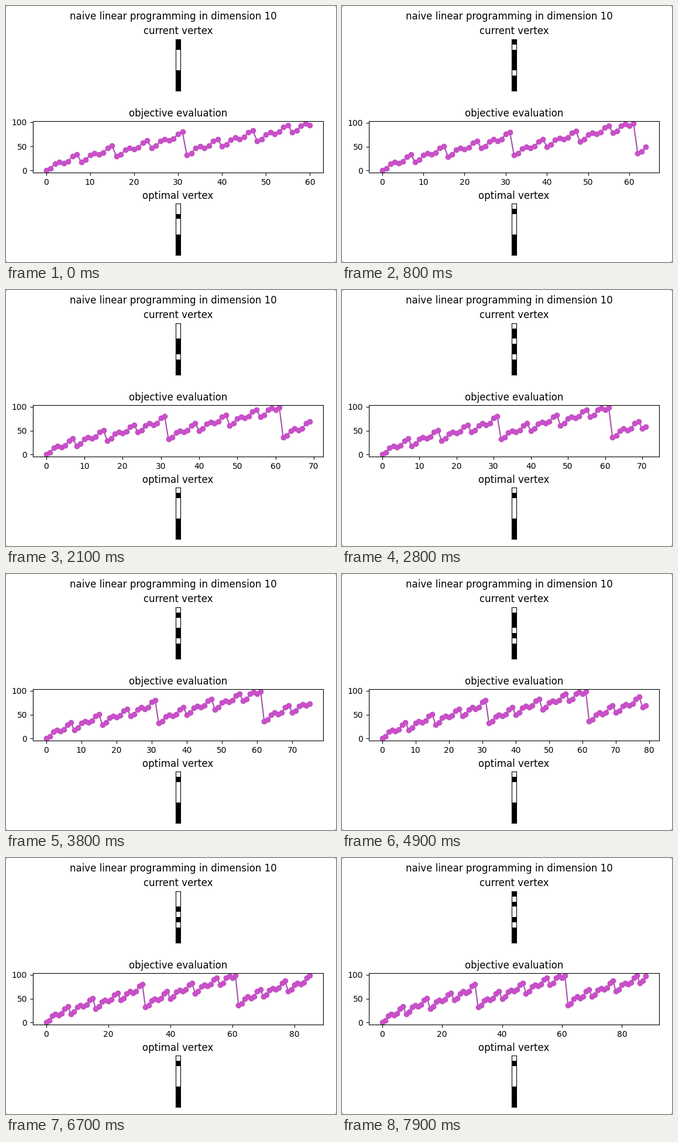
Recreate the animation shown at these times as a matplotlib script. Size 564x438 px, loop 8000 ms.

```python
import numpy as np
import matplotlib.pyplot as plt
from matplotlib.animation import FuncAnimation
from matplotlib.patches import FancyBboxPatch

plt.rcParams["font.family"] = "DejaVu Sans"

W, H, DPI = 564, 438, 100
TICK, FRAMES = 100, 80
DIM = 10
WEIGHTS = np.array([4, 14, 15, 18, 29, 32, 36, 40, 44, 48])
LIMIT = 100
FIRST = 60
# Tenths of a second at which the search visits another vertex
STEPS = [1, 3, 6, 8, 11, 13, 16, 19, 21, 24, 26, 29, 32, 35, 38, 40, 43, 46,
         49, 52, 55, 58, 61, 64, 67, 71, 74, 77]


def bits(k):
    return (k >> np.arange(DIM)) & 1


# Vertices in counting order, skipping the infeasible ones
visited = [k for k in range(128) if bits(k) @ WEIGHTS <= LIMIT]
visited = visited[:FIRST + len(STEPS) + 1]
scores = np.array([bits(k) @ WEIGHTS for k in visited])

fig = plt.figure(figsize=(W / DPI, H / DPI), dpi=DPI, facecolor="#8c8c8c")
fig.add_artist(FancyBboxPatch(
    (0, 0), W, H, boxstyle="round,pad=0,rounding_size=3", fc="white",
    ec="none", transform=None, zorder=-5))
fig.text(286 / W, 1 - 8.6 / H, "naive linear programming in dimension 10",
         ha="center", va="top", fontsize=12)


def add_axes(row, title):
    top = 56.6 + 140.8 * row
    ax = fig.add_axes([46 / W, 1 - (top + 88) / H, 496 / W, 88 / H])
    ax.set_title(title)
    return ax


def add_vertex(row, title):
    ax = add_axes(row, title)
    ax.set_xticks([])
    ax.set_yticks([])
    return ax.imshow(np.zeros((DIM, 1)), cmap="gray", vmin=0, vmax=1)


current = add_vertex(0, "current vertex")
plot = add_axes(1, "objective evaluation")
optimal = add_vertex(2, "optimal vertex")
line, = plot.plot([], [], "o-", color="#a94fa9", markerfacecolor="#cc4fcc",
                  markeredgecolor="#bf50bf")


def update(frame):
    n = FIRST + sum(s <= frame for s in STEPS)
    seen = scores[:n + 1]
    line.set_data(np.arange(n + 1), seen)
    plot.relim()
    plot.autoscale_view()
    current.set_data(bits(visited[n])[:, None])
    optimal.set_data(bits(visited[seen.argmax()])[:, None])
    return line, current, optimal


anim = FuncAnimation(fig, update, frames=FRAMES, interval=TICK,
                     init_func=lambda: update(0), repeat=True, repeat_delay=0)
plt.show()
```
